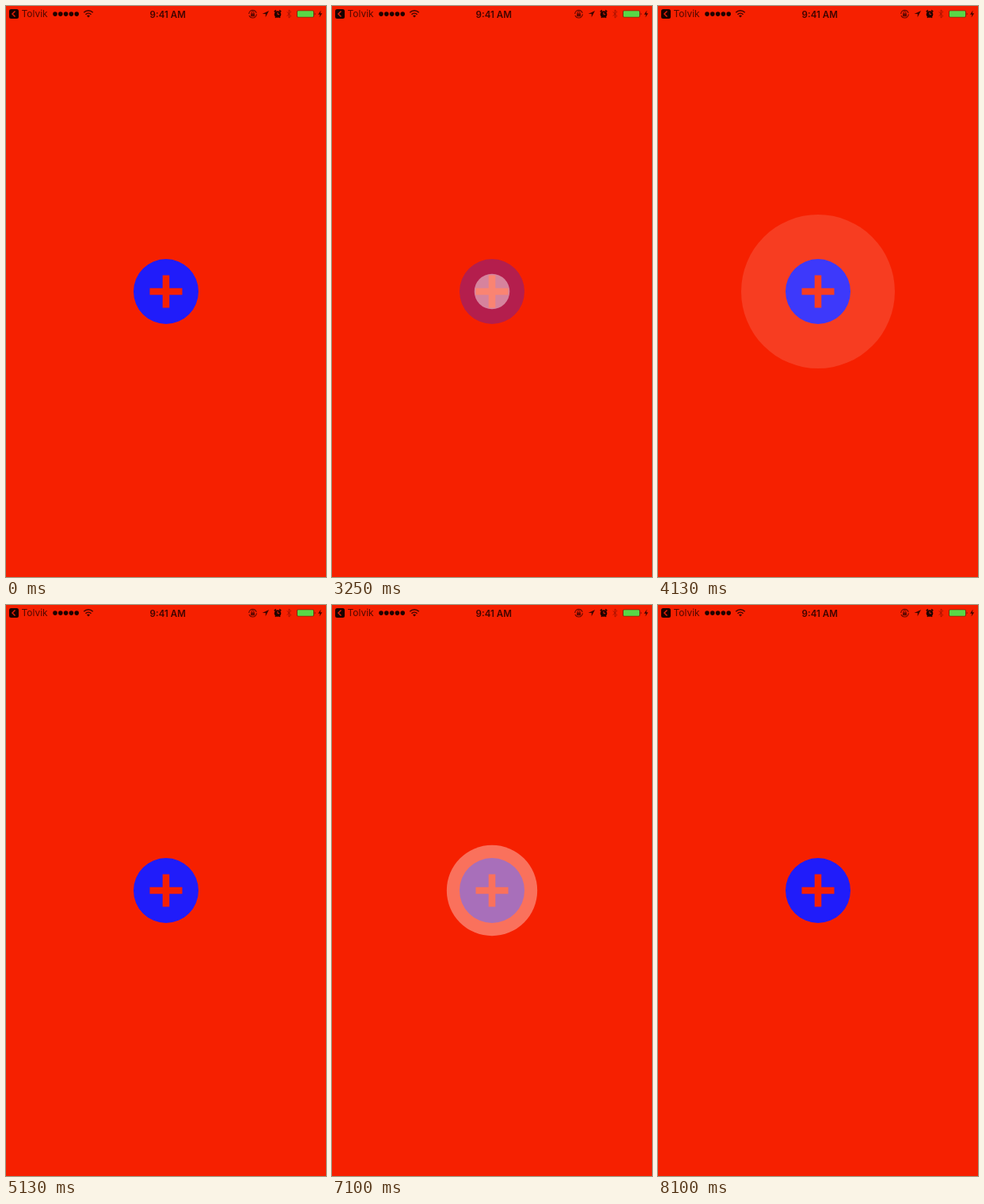
Animation of 404x720 px, one loop 8.12 s. Source, as an HTML page:

```html
<!DOCTYPE html>
<html lang="en">
<head>
<meta charset="utf-8">
<title>Ripple button</title>
<style>
  html, body { margin: 0; width: 100%; height: 100%; overflow: hidden; background: #f62000; }
  svg { display: block; width: 100%; height: 100%; }
  text { font-family: Inter, Roboto, "Liberation Sans", sans-serif; }
</style>
</head>
<body>
<svg viewBox="0 0 404 720">
  <rect width="404" height="720" fill="#f62000"/>

  <g id="status" fill="#400500">
    <rect x="4" y="4" width="12" height="12" rx="2.5" fill="#180200"/>
    <path d="M11.5 6.5 8 10l3.5 3.5" fill="none" stroke="#e02008" stroke-width="1.5"/>
    <text x="19.5" y="14.2" font-size="12" fill="#520800">Tolvik</text>
    <g id="signal" fill="#200300"></g>
    <path d="M98.3 8.2a8 8 0 0 1 11.4 0M100.5 10.7a5 5 0 0 1 7 0" fill="none" stroke="#400500" stroke-width="1.6"/>
    <path d="M102 12.4a2.8 2.8 0 0 1 4 0l-2 2.2z"/>
    <text x="204.3" y="14.5" font-size="11.6" font-weight="600" text-anchor="middle">9:41 AM</text>
    <g fill="none" stroke="#650900">
      <circle cx="311.5" cy="10.2" r="4.8" stroke-width="1.2" stroke-dasharray="13 2"/>
      <path d="M310 9.5V8.4a1.5 1.5 0 0 1 3 0v1.1"/>
    </g>
    <rect x="309" y="9.3" width="5" height="4" rx=".6" fill="#650900"/>
    <path d="M332 6 323.5 10h4.2v4.3z"/>
    <circle cx="343" cy="10.5" r="4.3" fill="#200300"/>
    <path d="M338.8 7.4l2-2M347.2 7.4l-2-2M340 14.8l1-1.3M346 14.8l-1-1.3" stroke="#200300" stroke-width="1.6"/>
    <path d="M343 8v2.7h2.2" fill="none" stroke="#e02008"/>
    <path d="M354.8 7.4l5 5.2-2.6 2.4V5l2.6 2.4-5 5.2" fill="none" stroke="#a81200"/>
    <rect x="367" y="5.5" width="22" height="9" rx="1.8" fill="#7c2a08"/>
    <rect x="368" y="6.3" width="20" height="7.4" rx="1" fill="#58d846"/>
    <path d="M389.8 8.2q1.6 1.8 0 3.6z"/>
    <path d="M397.6 5.6 394 10.7h2.4l-.8 3.9 3.6-5.3h-2.4z"/>
  </g>

  <!-- Disc with the plus cut out -->
  <path id="button" fill="#201cfa" fill-rule="evenodd" d="M161 360a41 41 0 0 1 82 0a41 41 0 0 1-82 0z
    M197.7 339.5h8.6v16.2h16.2v8.6h-16.2v16.2h-8.6v-16.2h-16.2v-8.6h16.2z"/>
  <circle id="ripple" cx="202" cy="360" fill="#fff"/>
</svg>

<script>
const LOOP = 8120;
const TAPS = [3127, 6737];
const TOUCH_LEAD = 90;
const GROW = 1013, FADE = 1360;
const MAX_RADIUS = 97, MAX_ALPHA = .49;
const PRESSED_OPACITY = .3;
const RELEASE_DELAY = 120, RELEASE = 590;

const el = id => document.getElementById(id);
const clamp = x => Math.min(1, Math.max(0, x));
const easeOut = u => 1 - (1 - clamp(u)) ** 2;

for (let i = 0; i < 5; i++) {
  el('signal').insertAdjacentHTML('beforeend', `<circle cx="${62 + i * 6.8}" cy="10.1" r="2.8"/>`);
}

function render(t) {
  const tap = TAPS.filter(start => t >= start - TOUCH_LEAD).pop() ?? -LOOP;
  const age = t - tap;
  const release = clamp((age - RELEASE_DELAY) / RELEASE);
  el('button').setAttribute('fill-opacity', PRESSED_OPACITY + (1 - PRESSED_OPACITY) * release);
  el('ripple').setAttribute('r', MAX_RADIUS * easeOut(age / GROW));
  el('ripple').setAttribute('fill-opacity', MAX_ALPHA * (1 - clamp(age / FADE)));
}

const origin = performance.now();
function tick() {
  render((performance.now() - origin) % LOOP);
  requestAnimationFrame(tick);
}
tick();
</script>
</body>
</html>
```
